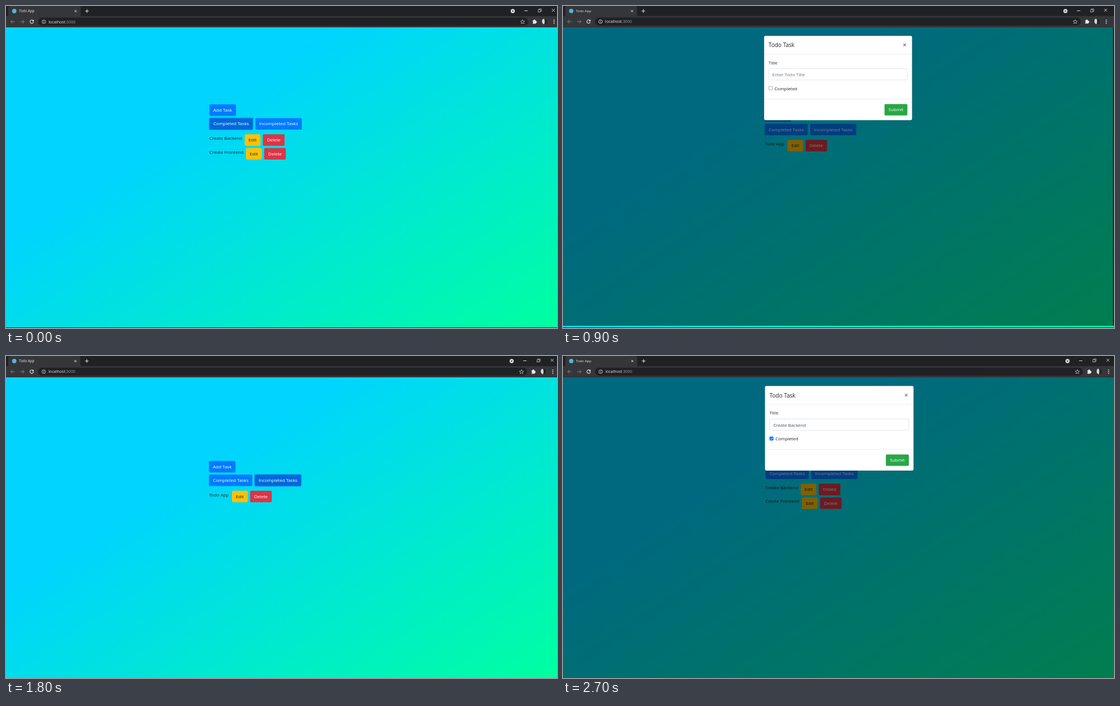
An HTML page with a canvas for the animation above (3.6 s loop, 978 by 573 pixels).

```html
<!DOCTYPE html>
<html lang="en">
<head>
<meta charset="utf-8">
<title>Todo App</title>
<style>
html, body { margin: 0; width: 100%; height: 100%; overflow: hidden; background: #202124; }
canvas { display: block; }
</style>
</head>
<body>
<canvas id="stage" width="978" height="573"></canvas>
<script>
const ctx = document.getElementById('stage').getContext('2d');
const W = 978, H = 573, SCENE_MS = 900;
const BLUE = '#007bff', YELLOW = '#ffc107', RED = '#dc3545', GREEN = '#28a745', INK = '#212529';
const DONE = [['Create Backend', 58.5], ['Create Frontend', 60.7]];
const OPEN = [['Todo App', 36.8]];

const scenes = [
  { zoom: 1, bottom: 572, tasks: DONE, focus: 'Completed Tasks' },
  { zoom: 0.9914, bottom: 569, tasks: OPEN, modal: { value: '', done: false } },
  { zoom: 0.9978, bottom: 573, tasks: OPEN, focus: 'Incompleted Tasks' },
  { zoom: 0.9956, bottom: 573, tasks: DONE, modal: { value: 'Create Backend', done: true } },
];

function box(x, y, w, h, fill, r = 0, stroke) {
  ctx.beginPath();
  ctx.roundRect(x, y, w, h, r);
  ctx.fillStyle = fill;
  ctx.fill();
  if (stroke) {
    ctx.strokeStyle = stroke;
    ctx.lineWidth = 0.6;
    ctx.stroke();
  }
}

function disc(x, y, r, fill) {
  ctx.beginPath();
  ctx.arc(x, y, r, 0, Math.PI * 2);
  ctx.fillStyle = fill;
  ctx.fill();
}

function line(path, color, width = 1) {
  ctx.strokeStyle = color;
  ctx.lineWidth = width;
  ctx.stroke(new Path2D(path));
}

function text(str, x, y, color, { size = 8, weight = 400, align = 'left' } = {}) {
  ctx.font = `${weight} ${size}px "Open Sans", "Noto Sans", sans-serif`;
  ctx.textAlign = align;
  ctx.fillStyle = color;
  ctx.fillText(str, x, y + size * 0.36);
}

function button(label, x, y, w, fill, { color = '#fff', focused = false } = {}) {
  if (focused) box(x - 1.6, y - 1.6, w + 3.2, 23.7, 'rgba(38,143,255,.5)', 3);
  box(x, y, w, 20.5, focused ? '#0069d9' : fill, 2);
  text(label, x + w / 2, y + 10.2, color, { align: 'center' });
}

function drawBrowser() {
  box(0, 0, 1000, 38, '#202124');
  box(4, 0, 128.5, 20, '#35363a', [4, 4, 0, 0]);
  box(0, 18, 1000, 20, '#35363a');
  disc(14.7, 9, 3.9, '#53b4d8');
  text('Todo App', 23, 9, '#e8eaed', { size: 6.2 });
  line('M121.7 7.2l3.8 3.8m0-3.8l-3.8 3.8', '#e8eaed', 0.9);
  line('M140.6 9h6.4m-3.2-3.2v6.4', '#e8eaed');

  disc(899.5, 9, 3.7, '#dadce0');
  ctx.fillStyle = '#202124';
  ctx.fill(new Path2D('M897.7 8.2h3.6l-1.8 2.3z'));
  line('M920 8.5h6m22.2 2h-4m0 0', '#e8eaed', 0.9);
  box(944.6, 6.7, 4, 4, '#202124', 0, '#e8eaed');
  line('M946 6.5V5.2h4.3v4.3h-1.5', '#e8eaed', 0.7);
  line('M969 5l5 5m0-5l-5 5', '#e8eaed', 0.9);

  line('M15.5 28H8.3m3.2-3.2L8.3 28l3.2 3.2M25.2 28h7.2m-3.2-3.2l3.2 3.2-3.2 3.2', '#8b8d91', 0.9);
  line('M48.2 25.8a3.1 3.1 0 1 0 .7 2.7', '#e8eaed', 1.1);
  ctx.fillStyle = '#e8eaed';
  ctx.fill(new Path2D('M49.3 24.2v3.3h-3.3z'));

  box(57, 20.8, 870, 14.4, '#202124', 7.2);
  line('M70.4 28a3.2 3.2 0 1 0-6.4 0a3.2 3.2 0 1 0 6.4 0M67.2 27.5v2.2m0-3.8v.9', '#e8eaed', 0.8);
  text('localhost', 75.5, 28, '#e8eaed', { size: 7.1 });
  const hostWidth = ctx.measureText('localhost').width;
  text(':3000', 75.5 + hostWidth, 28, '#9aa0a6', { size: 7.1 });
  line('M917 24.4l1.1 2.5 2.7.2-2.1 1.8.7 2.7-2.4-1.5-2.4 1.5.7-2.7-2.1-1.8 2.7-.2z', '#dadce0', 0.7);

  box(934.8, 25.6, 6, 6, '#e8eaed', 0.8);
  disc(938, 25.4, 1.3, '#e8eaed');
  disc(941, 28.6, 1.3, '#e8eaed');
  disc(934.9, 28.7, 1, '#35363a');

  disc(955.5, 28, 5, '#25241f');
  ctx.fillStyle = '#d5d8d6';
  ctx.fill(new Path2D('M952 24.2q1.7-2 3.6-.8l.7 4.6-.9 4.8q-3.8-1-4.2-5z'));
  for (const y of [25, 28, 31]) disc(972.7, y, 0.9, '#e8eaed');
}

function drawPage({ tasks, focus }) {
  const cx = 492, cy = 306, dx = 0.545 * 492, dy = 0.839 * 492;
  const sky = ctx.createLinearGradient(cx - dx, cy - dy, cx + dx, cy + dy);
  sky.addColorStop(0.32, '#00d4ff');
  sky.addColorStop(1, '#00ffa0');
  box(0, 38, 984.5, 545, sky);

  const top = 175 + (2 - tasks.length) * 12.1;
  const tab = (label, x, w) => button(label, x, top + 24.4, w, BLUE, { focused: label === focus });
  button('Add Task', 361, top, 47.2, BLUE);
  tab('Completed Tasks', 361, 77.2);
  tab('Incompleted Tasks', 442.6, 82.4);
  tasks.forEach(([name, width], i) => {
    const y = top + 53.3 + i * 24.5, x = 361 + width + 4.2;
    text(name, 361, y + 6.9, INK);
    button('Edit', x, y, 28, YELLOW, { color: INK });
    button('Delete', x + 32.3, y, 38.4, RED);
  });
}

function drawModal({ value, done }) {
  box(0, 38, 984.5, 545, 'rgba(0,0,0,.5)');
  box(360, 53.5, 265, 151.4, '#fff', 2.5, 'rgba(0,0,0,.2)');
  line('M360 86.4h265M360 167h265', '#dee2e6', 0.6);
  text('Todo Task', 368, 70.4, INK, { size: 10.1, weight: 500 });
  line('M609.5 67.6l4.6 4.6m0-4.6l-4.6 4.6', '#777', 1.2);
  text('Title', 368, 102, INK);
  box(368.2, 112.6, 248.2, 20.2, '#fff', 2, '#ced4da');
  text(value || 'Enter Todo Title', 374.8, 123.2, value ? '#495057' : '#6c757d');
  box(368.5, 144.3, 6.4, 6.4, done ? '#0075ff' : '#fff', 1, done ? '#0075ff' : '#767676');
  if (done) line('M369.8 147.6l1.5 1.5 2.6-3.2', '#fff', 1);
  text('Completed', 378.6, 148, INK);
  button('Submit', 575.6, 175.9, 41, GREEN);
}

function drawScene(scene) {
  ctx.save();
  ctx.beginPath();
  ctx.rect(0, 0, W, scene.bottom);
  ctx.clip();
  box(0, 0, W, H, '#202124');
  ctx.scale(scene.zoom, scene.zoom);
  drawPage(scene);
  if (scene.modal) drawModal(scene.modal);
  drawBrowser();
  ctx.restore();
}

function tick(now) {
  const index = Math.floor(now / SCENE_MS) % scenes.length;
  box(0, 0, W, H, '#10241f');
  // The first scene stays visible under the shorter ones.
  drawScene(scenes[0]);
  if (index) drawScene(scenes[index]);
  requestAnimationFrame(tick);
}
requestAnimationFrame(tick);
</script>
</body>
</html>
```
